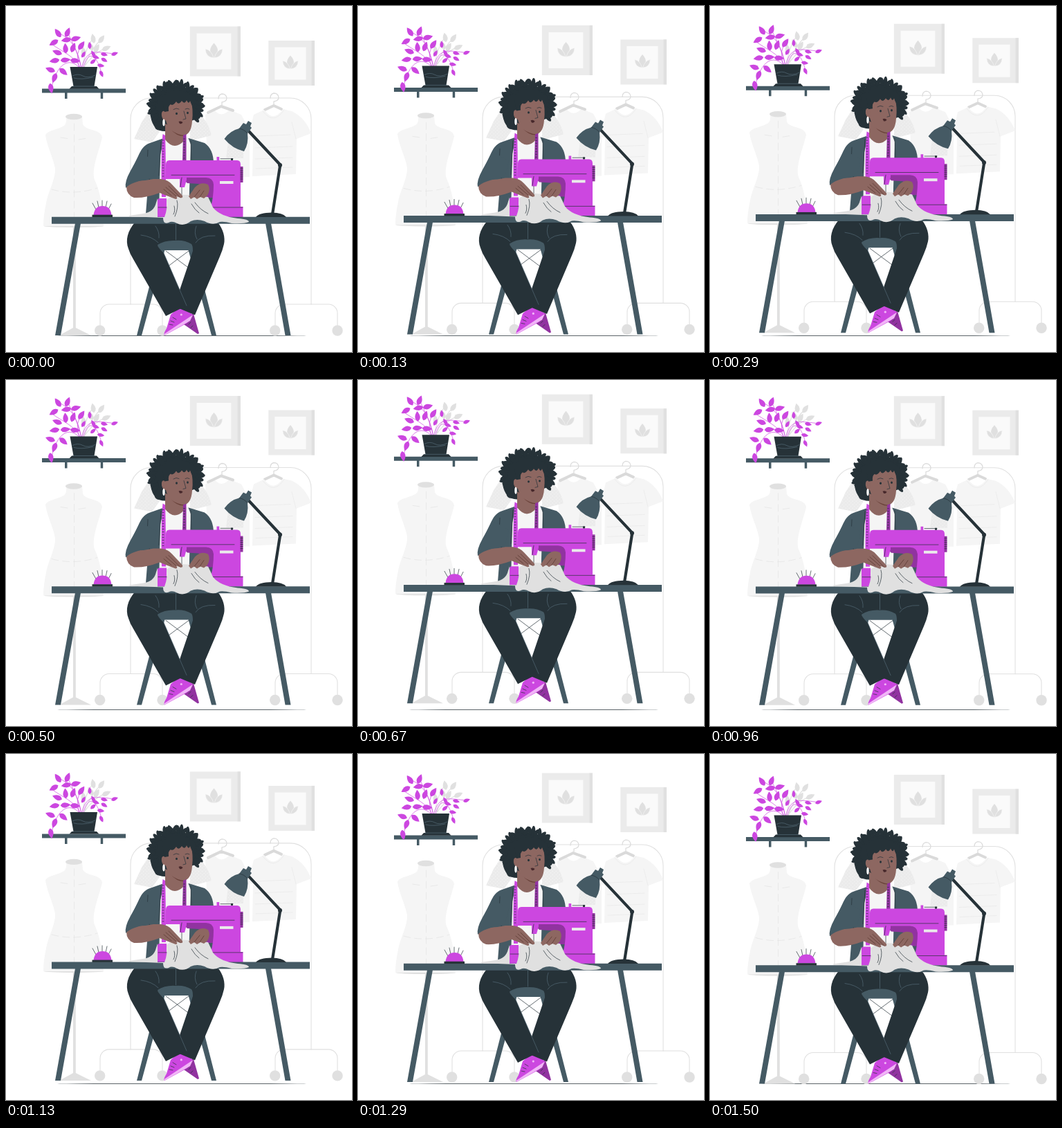
Write an HTML page that moves like this. It is 500 by 500 pixels and loops after 1.54 s.

```html
<!DOCTYPE html>
<html lang="en">
<head>
<meta charset="utf-8">
<title>Sewing studio</title>
<style>
  html, body { margin: 0; width: 100%; height: 100%; overflow: hidden; background: #fff; }
  svg { display: block; width: 100vw; height: 100vh; }
  .main { fill: #cc47e0; }
  .deep { fill: #9133a0; }
  .dark { fill: #263238; }
  .slate { fill: #455a64; }
  .skin { fill: #8d6761; }
  .g1 { fill: #fafafa; }
  .g2 { fill: #f5f5f5; }
  .g3 { fill: #ebebeb; }
  .g4 { fill: #e0e0e0; }
  .line { fill: none; stroke-linecap: round; stroke-linejoin: round; }
  .ink { stroke: #263238; stroke-width: .7; }
  .soft { stroke: #e0e0e0; stroke-width: 1.1; }
  .seam { stroke: #5b7280; stroke-width: .6; }
</style>
</head>
<body>
<svg viewBox="0 0 500 500">
  <defs>
    <pattern id="lace" width="5" height="5" patternUnits="userSpaceOnUse">
      <rect class="g3" width="5" height="5"/>
      <circle class="g1" cx="1.2" cy="1.3" r=".6"/>
      <circle class="g1" cx="3.7" cy="3.8" r=".6"/>
    </pattern>
    <g id="lotus" class="g4">
      <path d="M0-10.500Q-7-3-5 3Q-3 9 0 11Q3 9 5 3Q7-3 0-10.500Z"/>
      <path d="M-12.500-2Q-4-1-.5 11Q-12 10-12.500-2ZM12.500-2Q4-1 .5 11Q12 10 12.500-2Z" stroke="#fafafa" stroke-width=".6"/>
    </g>
    <g id="foot">
      <path class="line soft" d="M136 462V444A13 13 0 0 1 149 431H213A13 13 0 0 1 226 444V462"/>
      <circle class="g4" cx="135.700" cy="469" r="7.700"/>
      <circle class="g4" cx="226" cy="469" r="7.700"/>
    </g>
    <g id="hanger" class="line">
      <path stroke="#dcdcdc" stroke-width="1.300" d="M0 0V-4Q7-5 7-10Q6-16 0-16Q-5-15-5-9"/>
    </g>
  </defs>

  <ellipse class="dark" cx="254" cy="476.400" rx="180" ry=".45"/>

  <g id="scene">
    <!-- wall pictures -->
    <path class="g3" d="M265.800 29.500H339V101.500H265.800Z"/>
    <path class="g4" d="M334.500 29.500H339V101.500H334.500Z"/>
    <path class="g1" d="M275.500 39.500H325.300V91.500H275.500Z"/>
    <use href="#lotus" x="300.500" y="64"/>
    <path class="g3" d="M379.300 50H446V115H379.300Z"/>
    <path class="g4" d="M441.500 50H446V115H441.500Z"/>
    <path class="g1" d="M388.300 59.500H433.500V106.500H388.300Z"/>
    <use href="#lotus" transform="translate(411 81) scale(.9)"/>

    <!-- clothes rack -->
    <path class="line soft" d="M180 431V163A30 30 0 0 1 210 133H411A30 30 0 0 1 441 163V431"/>
    <use href="#foot"/>
    <use href="#foot" x="253"/>
    <path class="g2" d="M288 157L301 150Q311 163 323 150L340 157L352 180V247H292Z"/>
    <path fill="url(#lace)" d="M208 150L196 168L185 192L211 197L226 176ZM266 150L281 157Q293 169 297 187L266 195ZM321 196H343V220H318Z"/>
    <path class="line" stroke="#dadada" stroke-width="4" d="M292 154L311 145L328 151M374 150L387 144L398 149"/>
    <use href="#hanger" x="312" y="143"/>
    <use href="#hanger" x="387" y="142"/>
    <path class="g2" d="M358 157L373 150Q387 169 400 149L413 152Q432 161 441 184L420 192L419 243L356 246L357 192L350 190Z"/>
    <path class="line" stroke="#e9e9e9" stroke-width=".7" d="M371 152Q387 173 402 150M419 192L413 168M362 188L411 186M360 205L414 203M360 221L414 219M361 235L414 233"/>

    <!-- dress form -->
    <path class="g4" d="M97 318H100.800V465L123 476H77L97 465Z"/>
    <ellipse class="g4" cx="98" cy="318" rx="43" ry="2"/>
    <path class="g2" d="M87 160Q88 170 84 173C74 179 59 180 57 187C60 205 69 221 71 235C72 249 61 268 58 285Q54 303 54 318H141C140 294 137 270 128 251C123 236 134 211 139 190Q138 183 128 180Q112 176 111 171L110 160Z"/>
    <ellipse class="g4" cx="98" cy="160" rx="12" ry="4.200"/>
    <path class="line" stroke="#e2e2e2" stroke-width=".7" stroke-dasharray="10 6" d="M98.500 170V315M79 190L92 192M105 193L118 191M66 265Q98 274 132 263"/>

    <!-- shelf and plant -->
    <path class="slate" d="M52 119.500H173V125.500H52ZM85 125H88.500V134H85ZM136.700 125H140.200V134H136.700Z"/>
    <path class="line soft" d="M110 90Q116 55 128 45M112 90Q125 68 146 60M114 85Q124 60 139 47"/>
    <g id="greyLeaves" class="g4"></g>
    <path class="line" stroke="#cc47e0" stroke-width=".7" d="M109 90C104 64 96 48 76 39M109 90C101 58 92 46 89 38M108 90C98 71 82 67 66 55M107 90C91 72 73 84 66 118M110 88C116 60 135 67 156 69M112 88C120 59 133 75 138 97M106 90Q99 66 110 57"/>
    <g id="leaves" class="main"></g>
    <path class="dark" d="M92.500 88H132L127.500 116H131L134.500 119.700H91.500L95 116H97.500Z"/>
    <path class="line seam" d="M96 101Q104 97 111 101T129 100M98 104Q108 107 126 103M97 116H128"/>

    <!-- chair -->
    <path class="slate" d="M222 347H231L196 476H189ZM262 347H271L304 476H297ZM214 335H278L270 353H222Z"/>
    <path class="line ink" d="M231 354L266 380M264 354L229 380"/>

    <!-- shoes -->
    <path class="deep" d="M260 445L271 445L279 473L277 474L254 458Z"/>
    <path class="main" d="M238 446L253 433L270 446L262 458L229 476Q227 474 232 466Z"/>
    <path fill="#f1b5f7" d="M229 476L228.500 474L266 449L270 446.500L266 455Z"/>
    <circle cx="253.300" cy="446" r="1.600" fill="#f1b5f7"/>
    <path class="line ink" d="M238 455L243 457M236 460L241 461M241 450L246 453M267 457L264 460M270 462L267 465"/>

    <!-- trousers -->
    <path class="dark" d="M245 313H306C314 322 317 335 315 344Q313 353 309 362L273 446.500L243 434L270 354Q270 346 268 344Q258 338 245 339Z"/>
    <path class="dark" d="M245 313H186C176 325 172 338 177 351Q179 358 184 366L231 448L261 433L228 357Q220 350 219 345Q230 338 245 339Z"/>
    <path class="line seam" d="M245.500 315V338M195 331Q211 333 220 342M216 318Q222 326 221 335M275 318Q271 328 276 337M274 342Q281 331 302 332M228 357L261 433"/>

    <!-- body -->
    <path class="slate" d="M228 191L208 198C199 201 195 208 191 217L175 250L205 262L202 300L215 305H300V228Q300 207 287 198L264 191Z"/>
    <path class="g2" d="M229 190H263L267 200L264 300H221L223 215Z"/>
    <path class="line ink" d="M205 208Q203 232 208 255M224 196L221 245M267 195L268 222"/>
    <path class="dark" d="M213 130Q245 100 278 130Q285 146 279 162L262 168L231 181Q213 182 209 160Z"/>
    <g id="curls" class="dark"></g>
    <path class="skin" d="M230 170V193Q243 210 257 195V183Z"/>
    <path fill="#694139" d="M238 178Q246 188 257 188V184Z"/>
    <path class="skin" d="M229 150L234 135H267Q271 150 269 166Q268 184 258 187Q247 186 238 179Q230 172 229 150Z"/>
    <path class="skin" d="M231 153Q224 149 225 159Q227 167 232 165Z"/>
    <path class="dark" d="M229 153L225 131Q246 112 274 132L272 148Q268 144 266 137Q264 143 261 136Q258 143 254 137Q249 144 246 138Q241 145 238 142Q234 144 235 152Z"/>
    <ellipse cx="228" cy="168.500" rx="1.700" ry="5" fill="#fff"/>
    <g class="dark">
      <ellipse cx="246.500" cy="155.500" rx="1.500" ry="1.700"/>
      <ellipse cx="262.500" cy="154.500" rx="1.400" ry="1.700"/>
    </g>
    <path class="line ink" d="M242 149.500Q246 146.500 250 149M259 149Q262 147 265 149M257 152L260 163L256 164"/>
    <path fill="#47282b" d="M249.500 167Q253 165.500 255.500 168Q254 171 251 170Z"/>

    <!-- measuring tape -->
    <path class="main" d="M226.500 185L230 187Q231 215 231 276H225Q223.500 215 226.500 185Z"/>
    <path class="deep" d="M256 187L260.500 185V225H255Z"/>
    <g id="ticks" class="line ink"></g>

    <!-- sewing machine -->
    <path class="deep" d="M252 246H295Q302 248 302 260V277H288Q288 260 278 257L262 256Z"/>
    <path class="main" d="M236 223H334Q339 223 339 229V290H342.500V305H219V281Q219 278 222 278H232V290H296Q300 276 300 258Q299 248 289 248H261V251L258 262H251V250H231V229Q231 223 236 223ZM304.500 218H308.200V224H304.500Z"/>
    <path class="line ink" d="M239 244.300H330M220 291H342M310 220.800H328M254 262V276M254 248L252 261"/>
    <path class="dark" d="M325 220H328V223H325Z"/>
    <path class="g3" d="M309 253H328.500V257H309Z"/>
    <path class="deep" d="M338.500 232H342.500V255H338.500Z"/>
    <path class="line ink" d="M339 235H342M339 238H342M339 241H342M339 244H342M339 247H342M339 250H342"/>

    <!-- table -->
    <path class="slate" d="M66 304.700H439V314.700H66ZM100 314H108L79 476H71ZM375 314H383L411.500 476H403.500Z"/>

    <!-- cloth -->
    <path class="g4" d="M178 303L198 300Q214 298 217 284Q219 278 219 278V305H229Q234 292 232 280Q244 271 262 273L292 276Q296 284 299 291Q309 304 335 307Q351 308 351 312Q344 315 326 314Q315 311 309 312Q299 318 287 311Q276 307 267 311Q257 319 247 314Q240 310 235 313Q227 316 227 306L178 304Z"/>
    <path class="line ink" d="M247 281Q250 290 244 304M243 289Q245 296 242 301M268 286Q273 295 279 299M273 284Q281 295 292 300"/>

    <!-- arms -->
    <path class="skin" d="M177 252Q196 254 213 250L224 250Q234 251 240 258L255 274Q256 278 252 277L246 275Q249 279 245 279L232 274L222 270Q201 278 185 277Q174 273 174 261Z"/>
    <path class="slate" d="M194 212Q188 224 180 238Q171 254 173 263Q180 254 212 249L218 225Z"/>
    <path class="skin" d="M264 275L273 262Q282 253 292 258Q296 265 291 274L286 278L281 276L276 279L272 276L267 279Z"/>
    <path class="line" stroke="#57362f" stroke-width=".7" d="M231 262L246 275M235 260L252 277M228 265L239 274M272 276L280 266M280 276L286 267"/>

    <!-- pincushion -->
    <path class="line ink" d="M130 294L125 285M134 291L132 282M139 290V281M144 291L146 282M148 294L152 286"/>
    <path class="main" d="M126.500 302Q128 289 139.500 289Q151 289 152.500 302Z"/>
    <path class="dark" d="M124.500 301.700H154V305H124.500Z"/>

    <!-- lamp -->
    <path class="line" stroke="#263238" stroke-width="4.200" d="M385 301L396.300 229.500L350 180"/>
    <circle class="dark" cx="396" cy="230" r="3"/>
    <path class="dark" d="M361 305Q366 298.500 384 298.500Q400 298.500 405 305Z"/>
    <path class="slate" d="M315.500 192Q324 180 337 177L343 169L347 171L350 166L355 169L353 174L355 176L349 184Q351 199 344 210Q327 206 315.500 192Z"/>
    <path class="line ink" d="M337 177Q344 178 349 184"/>
  </g>
</svg>
<script>
  const $ = id => document.getElementById(id);

  // Each leaf: x, y, tilt in degrees.
  const leaf = size => ([x, y, tilt]) =>
    `<path transform="translate(${x} ${y}) rotate(${tilt})" d="M${-size} 0Q${-size / 3} ${-size} ${size} 0Q${-size / 3} ${size} ${-size} 0Z"/>`;

  const pink = [
    [75, 39, 235], [89, 38, 292], [69, 53, 150], [87, 49, 170], [101, 47, 345],
    [74, 67, 200], [86, 61, 265], [97, 60, 290], [109, 57, 305], [86, 78, 355],
    [100, 79, 5], [70, 79, 170], [64, 92, 200], [83, 95, 40], [70, 104, 110],
    [65, 119, 80]
  ];
  const small = [
    [121, 57, 270], [112, 70, 300], [126, 69, 240], [130, 74, 20], [142, 70, 15],
    [157, 69, 340], [142, 78, 30], [126, 80, 320], [137, 86, 10], [138, 98, 65]
  ];
  const grey = [[126, 47, 260], [138, 48, 305], [122, 58, 240], [145, 61, 335], [112, 66, 265], [131, 61, 300]];

  $('leaves').innerHTML = pink.map(leaf(7.4)).join('') + small.map(leaf(5.2)).join('');
  $('greyLeaves').innerHTML = grey.map(leaf(7)).join('');

  // Locks of hair swirl outwards around the head.
  let locks = '';
  for (let i = 0; i < 34; i++) {
    const a = Math.PI * (0.72 + 1.48 * i / 33);
    const x = 245.5 + 35 * Math.cos(a), y = 144 + 31 * Math.sin(a);
    const tilt = a * 180 / Math.PI + 30 * Math.sin(i * 2.3);
    const size = 7 + 1.3 * Math.sin(i * 3.7);
    locks += `<ellipse rx="${size}" ry="2.9" transform="translate(${x} ${y}) rotate(${tilt})"/>`;
  }
  $('curls').innerHTML = locks + '<circle cx="221" cy="173" r="6.5"/><circle cx="276" cy="159" r="5"/>';

  let ticks = '';
  for (let y = 194; y < 250; y += 4) ticks += `M226 ${y}h2`;
  for (let y = 192; y < 222; y += 4) ticks += `M256.500 ${y}h2`;
  $('ticks').innerHTML = `<path d="${ticks}"/>`;

  // The scene floats up and down at constant speed, in 37 even steps.
  const LOOP = 1540, STEPS = 37, RISE = 10, PEAK = 720;
  const scene = $('scene'), start = performance.now();

  function lift(ms) {
    const t = Math.floor((ms % LOOP + 5) / LOOP * STEPS) / STEPS * LOOP;
    const gap = Math.abs(t - PEAK);
    return RISE * (1 - Math.min(gap, LOOP - gap) / (LOOP / 2));
  }

  function draw(now) {
    const y = 0.65 - lift(Math.max(0, now - start));
    scene.setAttribute('transform', `translate(0 ${y.toFixed(2)})`);
    requestAnimationFrame(draw);
  }
  draw(start);
</script>
</body>
</html>
```
